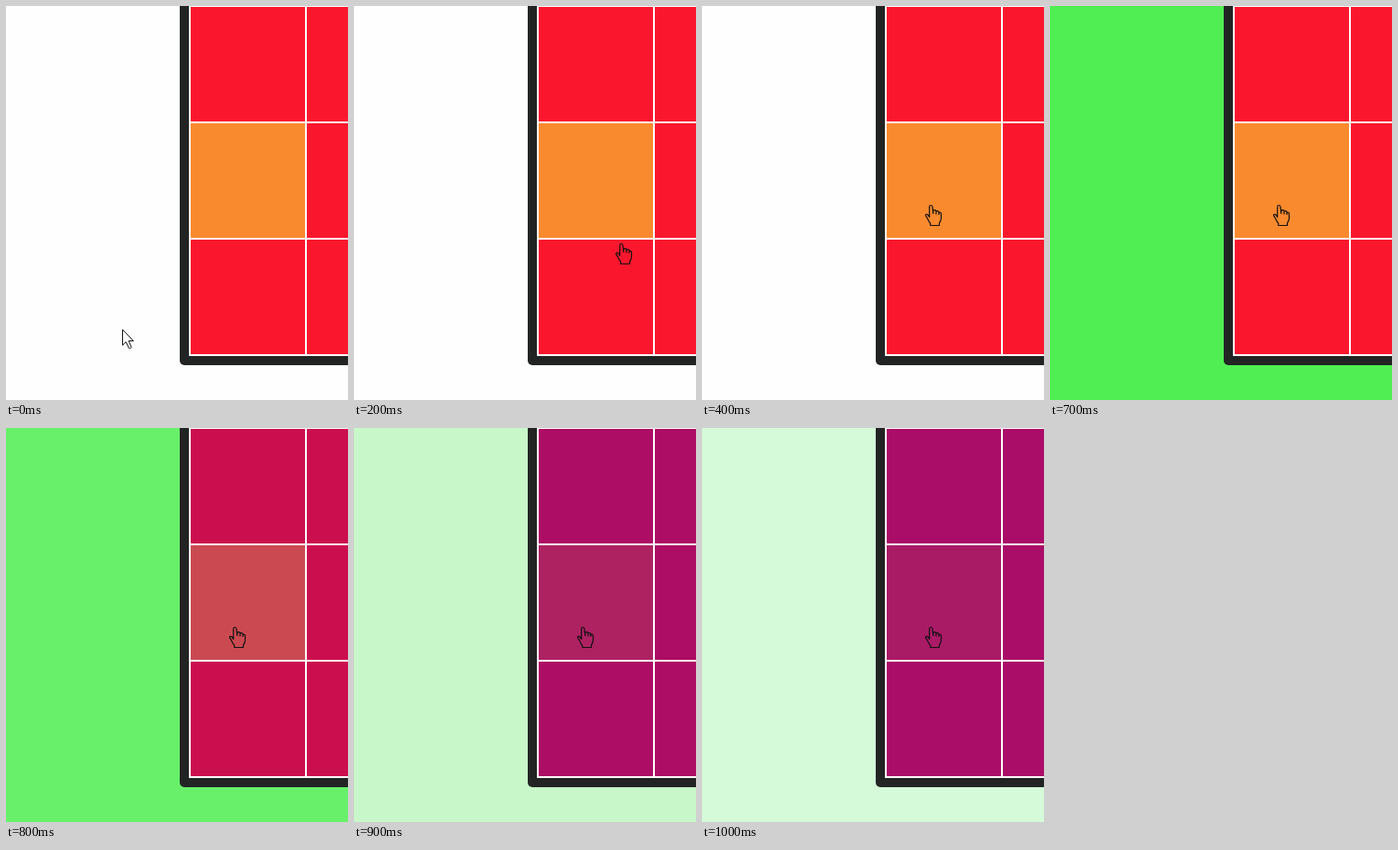
An HTML page that plays this animation: 374x430 px, repeating every 1100 ms.

```html
<!DOCTYPE html>
<html lang="en">
<head>
<meta charset="utf-8">
<title>Tile board</title>
<style>
  html, body { margin: 0; width: 100%; height: 100%; overflow: hidden; background: #fff; }
  svg { display: block; width: 374px; height: 430px; }
  .cursor { stroke: #111; stroke-linejoin: round; stroke-linecap: round; }
</style>
</head>
<body>
<svg viewBox="0 0 374 430">
  <rect id="page" width="374" height="430"/>
  <rect x="190" y="-20" width="220" height="412" rx="5" fill="#222424"/>
  <rect x="200" y="-20" width="200" height="402" fill="#fff"/>
  <g id="tiles"></g>
  <path id="arrow" class="cursor" fill="#fff" d="M.5 .5V17.2L4.3 13.6L7.4 20.4Q8.6 21.6 10.2 19.6L7.2 12.5H12Z"/>
  <path id="hand" class="cursor" fill="none" stroke-width="1.2"
    d="M-1.3 13.5V2Q-1.3 .5 .2 .5Q1.7 .5 2 2L2.8 9.5V6.4Q4.6 4.6 6 6.6V10V7.4Q7.8 5.8 9 7.8V10.5V8.6Q11 7.6 11.5 9.8V15Q11.3 17.5 9.5 19.8V22.5H-.3V20.2Q-2.6 17.5-3.4 14.8L-5.5 11.7Q-5.3 9.6-3.3 10.6L-1.3 13"/>
</svg>
<script>
const LOOP = 1100, STEP = 100;
const byId = id => document.getElementById(id);
const page = byId("page"), tiles = byId("tiles");
const arrow = byId("arrow"), hand = byId("hand");

// Pointer tip at each step until it rests on the orange tile.
const path = [[127, 353], [213, 309], [292, 259], [320, 231], [250, 217]];

// Page, tile and active tile colours by start time.
const looks = [
  [0, "#fefefe", "#fa172d", "#fa8a2e"],
  [700, "#50ee52", "#fa172d", "#fa8a2e"],
  [800, "#68f06b", "#cb0f4e", "#cb4a51"],
  [900, "#c8f8ca", "#ad0d64", "#ae2262"],
  [1000, "#d4fad9", "#aa0d68", "#aa1b66"]
];

function addTile(col, row) {
  const tile = document.createElementNS("http://www.w3.org/2000/svg", "rect");
  const box = { x: 202 + col * 127, y: 1 + row * 127, width: 125, height: 125 };
  for (const key in box) tile.setAttribute(key, box[key]);
  tiles.append(tile);
  return { tile, active: col === 0 && row === 1 };
}

const board = [];
for (let row = 0; row < 3; row++)
  for (let col = 0; col < 2; col++) board.push(addTile(col, row));

function draw(time) {
  const t = time % LOOP;
  const [, back, base, active] = looks.filter(look => t >= look[0]).pop();
  page.setAttribute("fill", back);
  for (const item of board)
    item.tile.setAttribute("fill", item.active ? active : base);

  const [x, y] = path[Math.min(Math.floor(t / STEP), path.length - 1)];
  const overBoard = x >= 200;
  for (const [shape, shown] of [[arrow, !overBoard], [hand, overBoard]]) {
    shape.setAttribute("transform", `translate(${x} ${y})`);
    shape.setAttribute("visibility", shown ? "visible" : "hidden");
  }
}

const start = performance.now();
function tick() {
  draw(performance.now() - start);
  requestAnimationFrame(tick);
}
tick();
</script>
</body>
</html>
```
